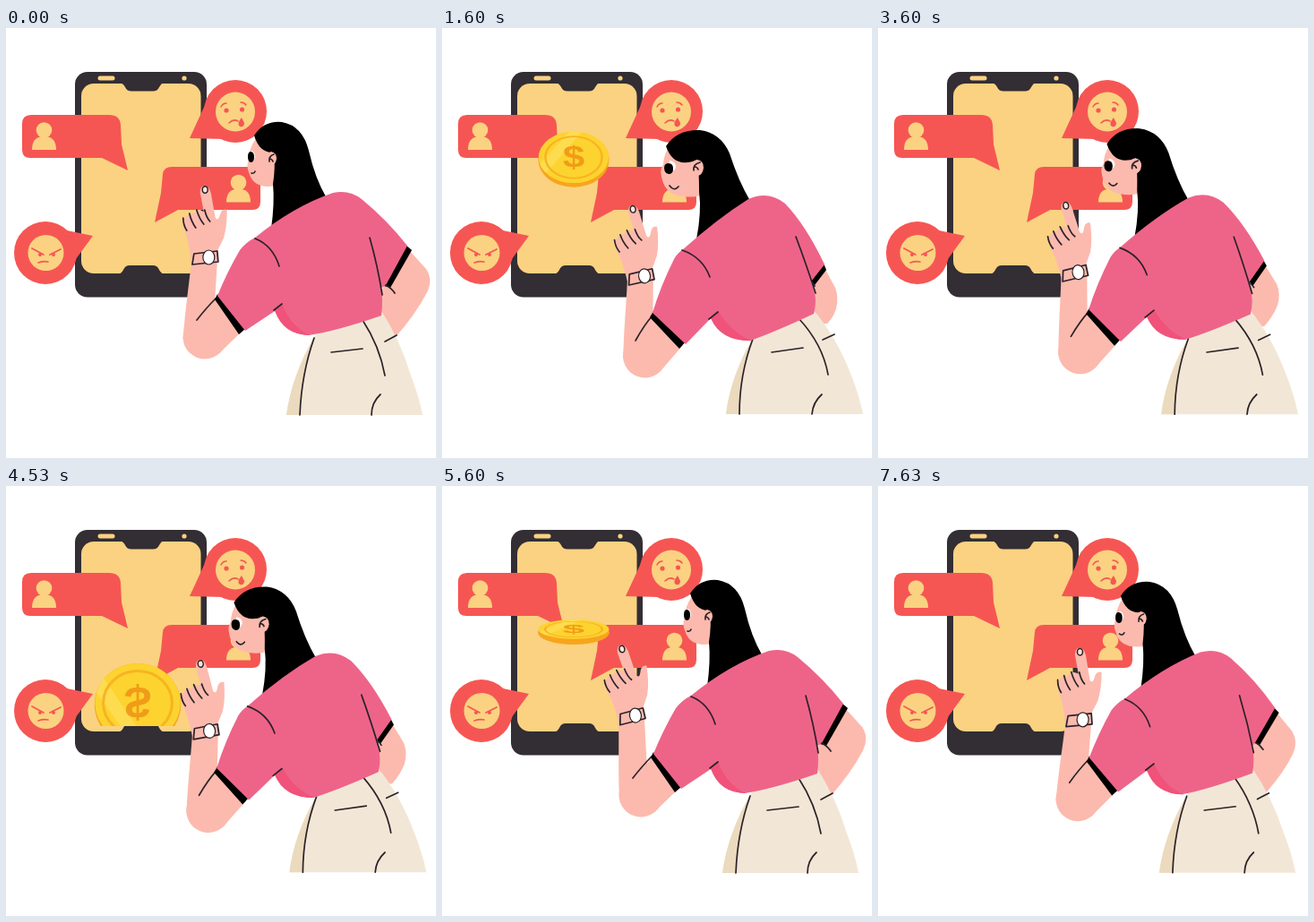
An HTML page for the animation above (7.71 s loop, 480x480 px).

```html
<!DOCTYPE html>
<html lang="en">
<head>
<meta charset="utf-8">
<title>Phone messages</title>
<style>
html, body { margin: 0; width: 100%; height: 100%; overflow: hidden; background: #fff; }
svg { display: block; width: 100%; height: 100%; }
.line { fill: none; stroke: #2b2229; stroke-width: 1.7; stroke-linecap: round; stroke-linejoin: round; }
.mark { fill: none; stroke: #f65653; stroke-width: 1.7; stroke-linecap: round; }
.red { fill: #f65653; }
.gold { fill: #fad281; }
.dark { fill: #332d34; }
.skin { fill: #fcbaae; }
</style>
</head>
<body>
<svg viewBox="0 0 480 480">
  <defs>
    <clipPath id="coinArea"><rect x="84" y="50" width="134" height="218"/></clipPath>
    <clipPath id="coinFace"><circle r="39"/></clipPath>
    <g id="person" class="gold">
      <circle r="8.8"/>
      <path d="M-13.5 22C-13.5 12 -9 7 0 7S13.5 12 13.5 22Z"/>
    </g>
  </defs>

  <g id="phone">
    <rect class="dark" x="77" y="49" width="147" height="251.500" rx="14"/>
    <rect class="gold" x="84" y="62" width="133.500" height="212" rx="14"/>
    <path class="dark" d="M127 61Q131 62 133 66Q135 70.500 140 70.500H164Q169 70.500 171 66Q173 62 176 61Z"/>
    <path class="dark" d="M125 275Q129 274 131 270Q133 265 138 265H164Q169 265 171 270Q173 274 177 275Z"/>
    <rect class="gold" x="102.500" y="53.500" width="19" height="5" rx="2.500"/>
    <circle class="gold" cx="199" cy="56" r="2.600"/>
  </g>

  <g id="bubbles">
    <path class="red" d="M28 97H115Q127 97 128 108L129 130L136 159L107 145H27Q18 145 18 136V107Q18 97 28 97Z"/>
    <use href="#person" x="42.500" y="114"/>
    <path class="red" d="M185 155H275Q284 155 284 164V194Q284 203 275 203H192L166 217L173 184L175 163Q176 155 185 155Z"/>
    <use href="#person" x="259.500" y="172.500"/>

    <circle class="red" cx="256" cy="93" r="35"/>
    <path class="red" d="M223 84L205 123L243 124Z"/>
    <circle class="gold" cx="256" cy="93.500" r="22"/>
    <circle class="red" cx="246" cy="92" r="2.600"/>
    <circle class="red" cx="263.500" cy="91" r="2.600"/>
    <path class="mark" d="M240 88Q242 84 246 84M262 83Q266 83 268 86M249 106Q254 101 259 104" style="stroke-width:1.500"/>
    <path class="red" d="M263 100Q257 107 261 110Q266 111 266 106Z"/>

    <circle class="red" cx="44" cy="251" r="35"/>
    <path class="red" d="M68 226L97 232L75 262Z"/>
    <circle class="gold" cx="44.500" cy="251" r="20"/>
    <path class="mark" d="M29 246L42 253M61 247L49 253M36 262Q42 260 47 261"/>
    <circle class="red" cx="38" cy="253" r="2"/>
    <circle class="red" cx="53" cy="253" r="2"/>
  </g>

  <g clip-path="url(#coinArea)">
    <g id="coin">
      <ellipse id="edge" rx="39.500" fill="#f7a51d"/>
      <g id="face">
        <circle r="39" fill="#fdd32f"/>
        <path d="M-39 12L-4 -40L10 -40L-32 26Z" fill="#fddc50" clip-path="url(#coinFace)"/>
        <circle r="31.500" fill="none" stroke="#f8b322" stroke-width="2.500"/>
        <text y="15" text-anchor="middle" font-family="'Liberation Sans', Arial, sans-serif" font-size="44" font-weight="700" fill="#f19c18">$</text>
      </g>
    </g>
  </g>

  <g id="back"></g>
  <g id="forearm">
    <circle class="skin" r="24.500"/>
    <path class="skin" d="M-24.400 2C-22 -30 -18 -55 -15 -84L14 -84L11 -38L20 14Z"/>
    <g id="hand">
      <g transform="translate(-222 -345)">
        <path class="skin" d="M207 262Q205 240 200 227Q196 218 200 212Q205 206 210 207Q214 201 221 205L217 184Q217 176 222 176Q227 176 229 184L234 212Q237 216 239 209Q241 201 247 203Q247 222 243 235L236 249L236 262Z"/>
        <path class="line" d="M198 212Q198 220 202 226M205 207Q207 216 212 223M213 203Q216 213 221 219M222 203Q224 212 228 216"/>
        <ellipse cx="222.500" cy="180.500" rx="3" ry="3.800" fill="#fde4dc" stroke="#2b2229" stroke-width="1.500"/>
        <path class="line" d="M210 252L236 249L237 261L208 264Z" style="fill:#fcbaae"/>
        <ellipse cx="226.500" cy="256" rx="6.500" ry="8" fill="#fff" stroke="#2b2229" stroke-width="1.200"/>
      </g>
    </g>
  </g>
  <g id="front"></g>
</svg>

<script>
const LOOP = 7710, COIN_CYCLE = 3855, POSE_CYCLE = 2700;
const $ = id => document.getElementById(id);
const SKIN = '#fcbaae', PINK = '#ee6489', BLACK = '#000';

// Each part: fill (null for a line), upright path, leaning path.
const backParts = [
  [SKIN, 'M450 248L469 269Q477 281 470 295Q457 320 434 346L412 330L421 288Z',
         'M427 268L439 290Q443 301 440 313Q437 323 430 330L412 330L415 286Z'],
  ['#f2e7d6', 'M345 343Q370 320 418 314Q440 348 452 388Q461 411 465 432L313 432Q319 388 345 343Z',
              'M347 346Q370 322 414 314Q440 344 457 388Q466 411 470 431L317 431Q322 388 347 346Z'],
  ['#ebdabd', 'M344 345Q330 385 328 432L313 432Q319 388 344 345Z',
              'M347 347Q332 387 332 431L317 431Q322 390 347 347Z'],
  [null, 'M344 346Q330 385 328 432M398 326Q417 355 423 388M363 362L398 358M423 350L436 343M408 432Q408 418 418 409',
         'M347 347Q332 387 332 431M398 324Q425 353 431 387M368 362L403 357M425 348L438 342M413 431Q414 418 424 409'],
  [SKIN, 'M279 123Q271 135 271 147Q268 154 271 161Q274 173 285 176Q292 178 300 176L302 135Z',
         'M254 131Q247 143 247 152Q243 158 245 166Q248 183 263 187Q277 190 289 187L289 145Z'],
  ['#fff', 'M274 137Q278 138 278 144Q277 150 272 150Z', 'M254 148Q261 149 261 155Q260 161 251 162Z'],
  [BLACK, 'M273 138Q277 138 277 144Q277 150 273 150Q270 149 270 144Q270 138 273 138Z',
          'M253 151Q258 151 258 157Q258 163 253 163Q248 162 248 156Q248 151 253 151Z'],
  [null, 'M274 162Q277 163 278 160', 'M254 176Q259 183 264 177'],
  [BLACK, 'M277 120Q288 103 308 105Q331 109 338 137Q345 168 358 190Q330 206 296 224Q300 195 298 174Q301 155 299 139Q283 140 277 120Z',
          'M250 132Q262 113 288 114Q311 117 321 140Q331 171 344 193Q317 215 284 236Q290 205 287 183Q287 160 285 147Q259 158 250 132Z'],
  [SKIN, 'M296 138Q302 139 302 146Q301 153 296 153Q291 152 291 146Q291 139 296 138Z',
         'M285 147Q292 148 292 156Q291 165 284 165Q278 163 278 156Q278 148 285 147Z'],
  [null, 'M299 141Q293 143 294 149M294 146Q297 146 298 149', 'M288 150Q280 152 281 159M282 155Q285 155 286 158'],
  [SKIN, 'M236 300L263 339L238 363L214 352L222 320Z', 'M237 318L269 354L243 384L219 372L227 340Z']
];
const frontParts = [
  [null, 'M234 302Q224 312 213 326', 'M235 321Q226 331 216 349'],
  [BLACK, 'M236 297L268 335L260 342L233 303Z', 'M236 316L272 350L265 358L232 323Z'],
  [BLACK, 'M446 242L453 248L429 290L422 288Z', 'M426 263L429 270L416 287L411 281Z'],
  [PINK, 'M278 234Q321 199 365 184Q383 180 397 191Q425 214 448 243L424 287L419 290Q421 305 419 321Q370 338 338 343Q312 342 300 316L267 338L236 299Q247 272 261 248Q268 239 278 234Z',
         'M268 248Q307 213 342 191Q364 181 383 196Q406 220 427 264L412 283L415 292Q419 305 415 319Q370 340 344 349Q315 349 300 324L272 353L235 318Q244 288 259 258Q263 251 268 248Z'],
  ['#f0527a', 'M300 315Q309 343 340 343Q319 335 308 308Z', 'M300 324Q311 350 346 349Q324 341 309 317Z'],
  [null, 'M278 235Q298 243 305 266M308 308L299 315M406 234Q415 266 420 298M424 287Q430 290 434 296',
         'M268 248Q291 256 299 278M308 317L298 325M395 233Q406 262 417 296M414 285Q415 286 416 288']
];

function build(parts, group) {
  return parts.map(([fill, upright, leaning]) => {
    const node = document.createElementNS('http://www.w3.org/2000/svg', 'path');
    if (fill) node.setAttribute('fill', fill); else node.setAttribute('class', 'line');
    group.appendChild(node);
    return { node, upright, goal: leaning.match(/[\d.]+/g).map(Number) };
  });
}
const body = [...build(backParts, $('back')), ...build(frontParts, $('front'))];

const mix = (a, b, p) => a + (b - a) * p;
const ease = u => (1 - Math.cos(Math.PI * u)) / 2;

function track(keys, t) {
  const next = keys.findIndex(k => k[0] > t);
  if (next < 0) return keys[keys.length - 1][1];
  const [t0, a] = keys[next - 1], [t1, b] = keys[next];
  return mix(a, b, ease((t - t0) / (t1 - t0)));
}

const leanKeys = [[0, 0], [240, 0], [1180, 1], [1580, 1], [2530, 0]];
const armKeys = [[0, -0.1], [270, -8], [1180, -3.2], [1580, -3.2], [2260, 0.7], [2700, -0.1]];
const handKeys = [[0, 0], [280, -2], [1180, -3.6], [1580, -3.6], [2230, 0]];

function drawWoman(t) {
  const lean = track(leanKeys, t);
  for (const { node, upright, goal } of body) {
    let i = 0;
    node.setAttribute('d', upright.replace(/[\d.]+/g, n => mix(+n, goal[i++], lean).toFixed(2)));
  }
  const x = mix(222, 226.5, lean), y = mix(345, 366, lean);
  $('forearm').setAttribute('transform', `translate(${x} ${y}) rotate(${track(armKeys, t)})`);
  $('hand').setAttribute('transform', `rotate(${track(handKeys, t)} 4 -89)`);
}

// A ballistic toss with a steady spin about the horizontal axis.
function drawCoin(t) {
  const y = 137 + 2.02e-4 * (t - 1400) ** 2;
  $('coin').style.display = y < 340 ? '' : 'none';
  const angle = 0.738 + 0.0038 * (t - 1600);
  const tilt = Math.cos(angle), depth = Math.abs(Math.sin(angle)) * 5;
  const size = 1 + 0.22 * ((y - 137) / 106) ** 2;
  $('coin').setAttribute('transform', `translate(147 ${y}) scale(${size})`);
  $('edge').setAttribute('ry', Math.abs(tilt) * 39.5 + depth / 2);
  $('edge').setAttribute('cy', depth / 2);
  $('face').setAttribute('transform', `translate(0 ${-depth / 4}) scale(1 ${tilt})`);
}

const start = performance.now();
function draw(now) {
  const t = Math.max(0, now - start) % LOOP;
  drawWoman(t % POSE_CYCLE);
  drawCoin(t % COIN_CYCLE);
  requestAnimationFrame(draw);
}
draw(start);
</script>
</body>
</html>
```
